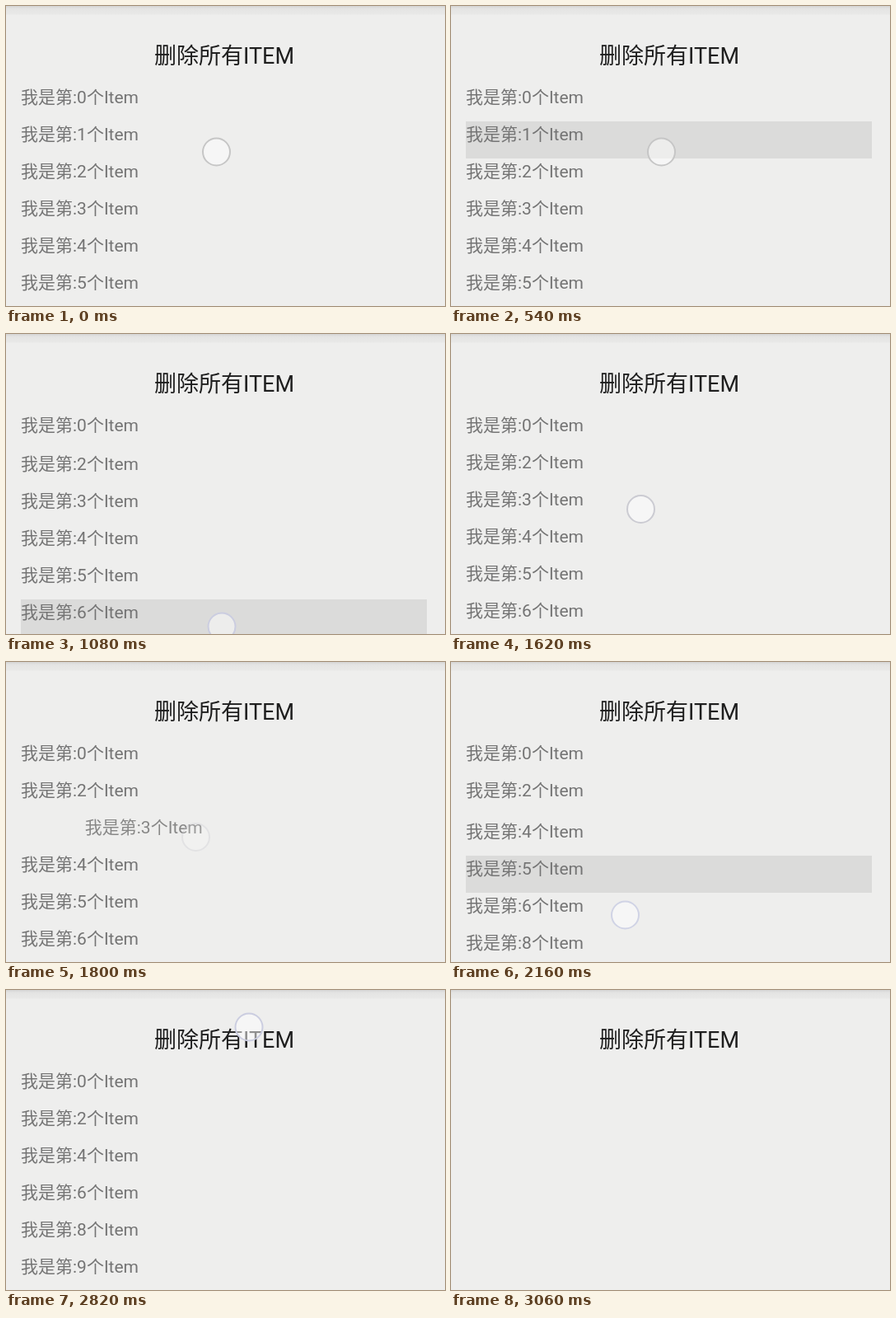
These frames come from a looping animation (533x364 px, 3.66 s). An HTML page:

```html
<!DOCTYPE html>
<html lang="zh-CN">
<head>
<meta charset="utf-8">
<style>
  html, body { margin: 0; width: 100%; height: 100%; overflow: hidden; background: #eeeeed; }
  svg { display: block; width: 533px; height: 364px; }
  text { font-family: Roboto, "Noto Sans CJK SC", "Noto Sans CJK", sans-serif; }
  #rows text { font-size: 21px; fill: #747474; }
  #title { font-size: 27px; fill: #1e1e1e; text-anchor: middle; }
</style>
</head>
<body>
<svg viewBox="0 0 533 364">
  <defs>
    <linearGradient id="shade" x1="0" y1="0" x2="0" y2="1">
      <stop offset="0" stop-color="#d4d4d4"/>
      <stop offset=".3" stop-color="#e4e4e3"/>
      <stop offset="1" stop-color="#e9e9e8"/>
    </linearGradient>
    <clipPath id="list"><rect x="18" y="95" width="493" height="269"/></clipPath>
  </defs>
  <rect width="533" height="364" fill="#eeeeed"/>
  <rect width="533" height="10.5" fill="url(#shade)"/>
  <text id="title" x="265" y="69.5">删除所有ITEM</text>
  <g id="rows" clip-path="url(#list)"></g>
  <circle id="touch" r="16.5" fill="#fff" fill-opacity=".5" stroke-width="2"/>
</svg>
<script>
const LOOP = 3660, STEP = 60;
const LEFT = 18, TOP = 95, WIDTH = 493, ROW = 45;
const SLIDE = 200, COLLAPSE = 200, CLEAR_ALL = 2850;

// Times at which each dismissed row slides out, shrinks and leaves the list.
const dismissals = {
  1: { slide: 652, collapse: 900, removed: 1110 },
  3: { slide: 1748, collapse: 2000, removed: 2634 },
  5: { slide: 2178, collapse: 2433, removed: 2634 },
  7: { slide: 1300, collapse: 1400, removed: 1600 }
};
const presses = [
  { id: 1, from: 540, to: 652 },
  { id: 6, from: 1080, to: 1140 },
  { id: 3, from: 1680, to: 1748 },
  { id: 5, from: 2100, to: 2178 }
];
const touches = [
  { x: 255.5, y: 177, from: 0, fade: 644, ring: "#c6c6c6" },
  { x: 262, y: 355, from: 1020, fade: 1100, ring: "#cbcde0" },
  { x: 230.5, y: 212.5, from: 1620, fade: 1740, ring: "#cbcbd2" },
  { x: 211.5, y: 307, from: 2040, fade: 2170, ring: "#d0d3e5" },
  { x: 295, y: 45, from: 2820, fade: 2900, ring: "#cbcde0" }
];
const FADE = 90;

const clamp = v => Math.min(1, Math.max(0, v));
const ease = v => (1 - Math.cos(Math.PI * clamp(v))) / 2;

function add(parent, tag, attrs) {
  const node = document.createElementNS("http://www.w3.org/2000/svg", tag);
  set(node, attrs);
  return parent.appendChild(node);
}
function set(node, attrs) {
  for (const key in attrs) node.setAttribute(key, attrs[key]);
}

const rowLayer = document.getElementById("rows");
const touchDot = document.getElementById("touch");
const rows = Array.from({ length: 11 }, (_, id) => {
  const group = add(rowLayer, "g", {});
  const back = add(group, "rect", { width: WIDTH, height: ROW, fill: "#dbdbda" });
  add(group, "text", { y: 22.5 }).textContent = `我是第:${id}个Item`;
  return { id, group, back };
});

function rowHeight(id, t) {
  const d = dismissals[id];
  if (!d) return ROW;
  if (t >= d.removed) return 0;
  return Math.round(ROW - (ROW - 1) * ease((t - d.collapse) / COLLAPSE));
}

function draw(t) {
  let y = TOP;
  for (const { id, group, back } of rows) {
    const start = dismissals[id] ? dismissals[id].slide : CLEAR_ALL;
    const out = ease((t - start) / SLIDE);
    const pressed = presses.some(p => p.id === id && t >= p.from && t < p.to);
    set(group, { transform: `translate(${LEFT + out * WIDTH} ${y})`, opacity: 1 - out });
    set(back, { opacity: pressed ? 1 : 0 });
    y += rowHeight(id, t);
  }
  const touch = touches.find(p => t >= p.from && t < p.fade + FADE);
  if (touch) {
    set(touchDot, {
      cx: touch.x, cy: touch.y, stroke: touch.ring,
      opacity: 1 - clamp((t - touch.fade) / FADE)
    });
  } else {
    set(touchDot, { opacity: 0 });
  }
}

const began = performance.now();
function tick() {
  const t = (performance.now() - began) % LOOP;
  draw(Math.floor(t / STEP) * STEP);
  requestAnimationFrame(tick);
}
tick();
</script>
</body>
</html>
```
